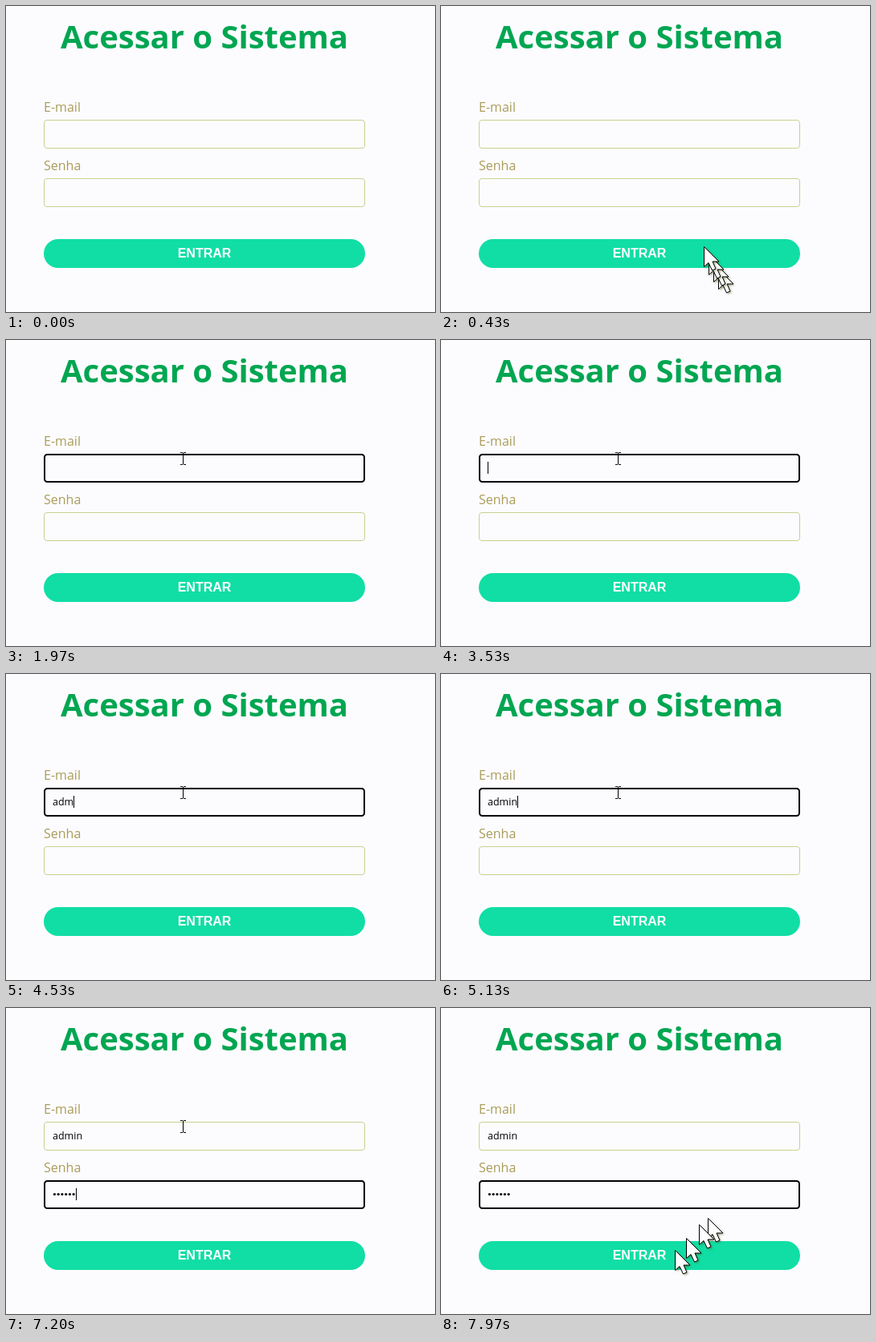
An HTML page with a canvas that plays this animation: 534 by 382 pixels, repeating every 8000 ms.

```html
<!DOCTYPE html>
<html lang="pt">
<head>
<meta charset="utf-8">
<title>Acessar o Sistema</title>
<style>
  html, body { margin: 0; width: 100%; height: 100%; overflow: hidden; background: #fcfcff; }
  canvas { display: block; }
</style>
</head>
<body>
<canvas id="stage" width="534" height="382"></canvas>
<script>
const ctx = document.getElementById('stage').getContext('2d');

const LOOP = 8000;
const STEP = 100 / 3;
const BLINK = 500;
const FOCUS_EMAIL = 1250;
const FOCUS_PASS = 5300;
const EMAIL_KEYS = [4230, 4370, 4500, 4650, 4780];
const PASS_KEYS = [6250, 6420, 6590, 6780, 6960, 7150];
const DOT_GAP = 4.75;
const FIELD = { x: 47, w: 400, h: 36, emailY: 142, passY: 215 };

// Pointer path: time, x, y
const PATH = [
  [300, 345, 328], [430, 322, 292], [560, 275, 225], [680, 236, 168],
  [780, 220, 148], [7700, 220, 148], [7767, 275, 195], [7833, 325, 238],
  [7866.7, 332, 262], [7900, 321, 270], [7933.3, 305, 287], [7966.6, 291, 302]
];
const ARROW = [[0, 0], [0, 25], [5.5, 20], [10, 29.5], [14.5, 27.5], [10.5, 18.5], [18.5, 18.5]];

function label(text, x, y, font, color, align = 'left') {
  ctx.font = font;
  ctx.fillStyle = color;
  ctx.textAlign = align;
  ctx.fillText(text, x, y);
}

function field(y, focused) {
  const line = focused ? 2 : 1;
  ctx.beginPath();
  ctx.roundRect(FIELD.x + line / 2, y + line / 2, FIELD.w - line, FIELD.h - line, 3.5);
  ctx.lineWidth = line;
  ctx.strokeStyle = focused ? '#000' : '#c9d08f';
  ctx.stroke();
}

function caret(t, since, x, y) {
  if ((t - since) % (2 * BLINK) >= BLINK) return;
  ctx.fillStyle = '#000';
  ctx.fillRect(Math.round(x), y + 10, 1, 15);
}

const typed = (keys, t) => keys.filter(k => k <= t).length;
const lastKey = (keys, n, start) => n ? keys[n - 1] : start;

function pointerAt(t) {
  if (t < PATH[0][0]) return null;
  const i = PATH.findIndex(p => p[0] > t);
  if (i < 0) return PATH[PATH.length - 1].slice(1);
  const [a, b] = [PATH[i - 1], PATH[i]];
  const u = (t - a[0]) / (b[0] - a[0]);
  return [1, 2].map(k => Math.round(a[k] + (b[k] - a[k]) * u));
}

function overField(x, y) {
  const inside = top => y >= top && y < top + FIELD.h;
  return x >= FIELD.x && x < FIELD.x + FIELD.w && (inside(FIELD.emailY) || inside(FIELD.passY));
}

function beam(x, y) {
  ctx.fillStyle = '#000';
  for (const end of [-8, 7]) {
    ctx.fillRect(x - 3, y + end, 3, 1);
    ctx.fillRect(x + 1, y + end, 3, 1);
  }
  ctx.fillRect(x, y - 7, 1, 14);
}

function arrow(x, y) {
  ctx.save();
  ctx.translate(x + 0.5, y + 0.5);
  ctx.beginPath();
  ARROW.forEach(p => ctx.lineTo(...p));
  ctx.closePath();
  ctx.shadowColor = 'rgba(70, 70, 0, 0.55)';
  ctx.shadowBlur = 3;
  ctx.shadowOffsetX = ctx.shadowOffsetY = 1.5;
  ctx.fillStyle = '#fff';
  ctx.fill();
  ctx.shadowColor = 'transparent';
  ctx.lineWidth = 1;
  ctx.strokeStyle = '#000';
  ctx.stroke();
  ctx.restore();
}

// The pointer leaves three copies behind it, newest on top
function pointer(t) {
  const now = Math.floor(t / STEP + 0.001);
  let last = '';
  for (let k = now - 3; k <= now; k++) {
    const p = pointerAt(k * STEP);
    if (!p || String(p) === last) continue;
    last = String(p);
    (overField(...p) ? beam : arrow)(...p);
  }
}

function draw(t) {
  ctx.fillStyle = '#fcfcff';
  ctx.fillRect(0, 0, 534, 382);

  label('Acessar o Sistema', 247, 53, 'bold 40px "Open Sans", sans-serif', '#00a651', 'center');
  const small = '16px "Open Sans", sans-serif';
  label('E-mail', 47, 132, small, '#aa9c58');
  label('Senha', 47, 205, small, '#aa9c58');

  const onPass = t >= FOCUS_PASS;
  const onEmail = t >= FOCUS_EMAIL && !onPass;
  field(FIELD.emailY, onEmail);
  field(FIELD.passY, onPass);

  const chars = typed(EMAIL_KEYS, t);
  const text = 'admin'.slice(0, chars);
  label(text, 58, 164, '12.5px "Open Sans", sans-serif', '#000');
  if (onEmail) {
    caret(t, lastKey(EMAIL_KEYS, chars, FOCUS_EMAIL), 58 + ctx.measureText(text).width, FIELD.emailY);
  }

  const dots = typed(PASS_KEYS, t);
  ctx.fillStyle = '#000';
  for (let i = 0; i < dots; i++) {
    ctx.beginPath();
    ctx.arc(60.4 + i * DOT_GAP, 232.5, 1.6, 0, 2 * Math.PI);
    ctx.fill();
  }
  if (onPass) {
    caret(t, lastKey(PASS_KEYS, dots, FOCUS_PASS), 58 + dots * DOT_GAP, FIELD.passY);
  }

  ctx.fillStyle = '#10dea5';
  ctx.beginPath();
  ctx.roundRect(FIELD.x, 291, FIELD.w, FIELD.h, 18);
  ctx.fill();
  label('ENTRAR', 247, 314, 'bold 16px "Liberation Sans", Arial, sans-serif', '#fff', 'center');

  pointer(t);
}

const start = performance.now();
function tick() {
  draw((performance.now() - start) % LOOP);
  requestAnimationFrame(tick);
}
tick();
</script>
</body>
</html>
```
